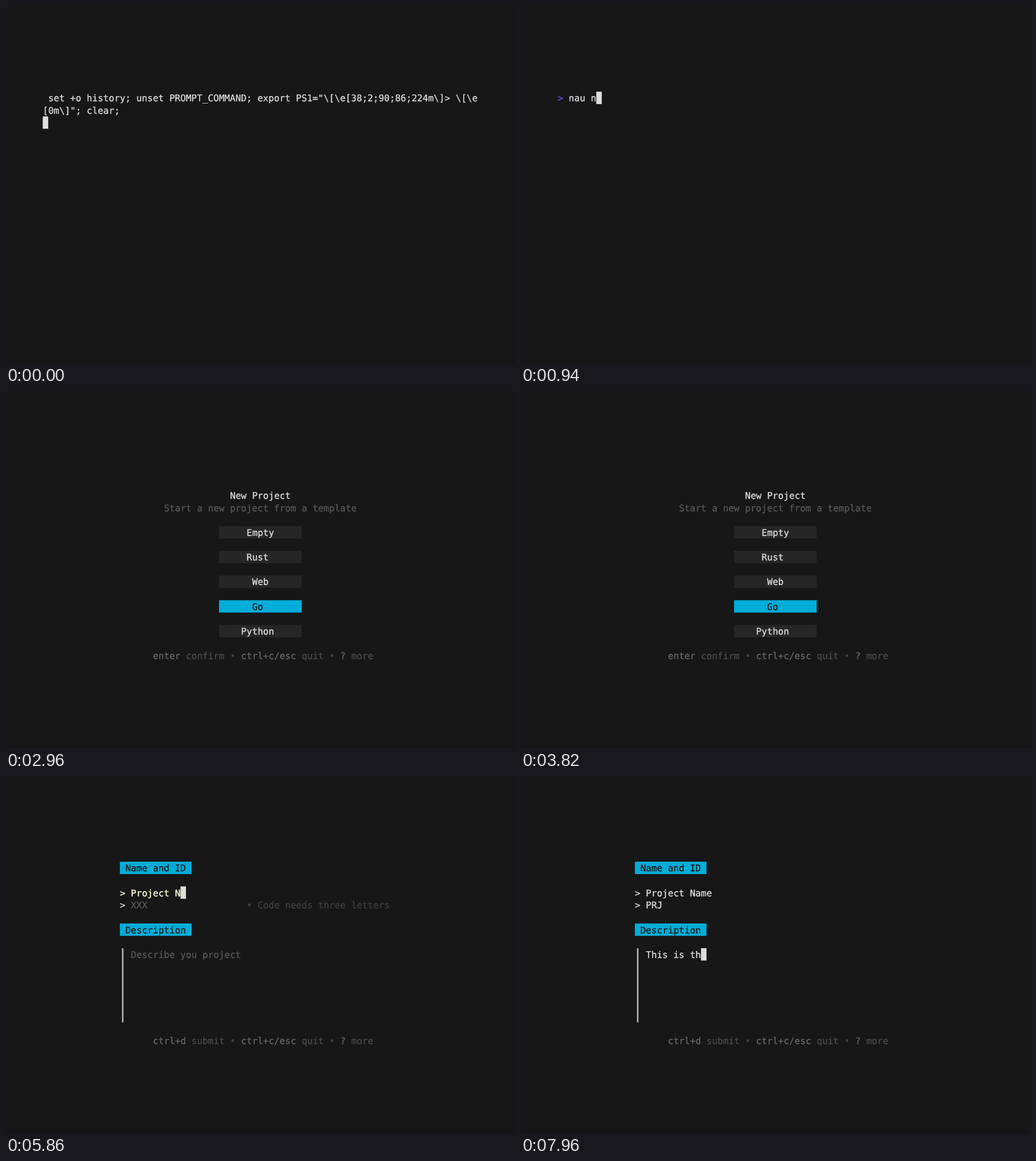
Write an HTML page with a canvas that moves like this. It is 894 px wide and 626 px high and loops after 8 s.

```html
<!DOCTYPE html>
<html lang="en">
<head>
<meta charset="utf-8">
<title>Terminal: new project</title>
<style>
  html, body { margin: 0; width: 100%; height: 100%; overflow: hidden; background: #171717; }
  canvas { display: block; }
</style>
</head>
<body>
<canvas id="stage" width="894" height="626"></canvas>
<script>
const LOOP = 8000;
const CELL = 9.677, LINE = 21.66, LEFT = 64.5, TOP = 150.3;
const BG = '#171717', FG = '#dddddd', CREAM = '#ffffd7', ACCENT = '#00add8';
const DIM = '#585858', KEY = '#666666', HINT = '#4a4a4a', DOT = '#3f3f3f';

const ctx = document.getElementById('stage').getContext('2d');
const colX = col => LEFT + col * CELL;
const rowY = row => TOP + row * LINE;

// A thin outline gives the letters a medium weight
function text(row, col, str, color = FG) {
  const x = colX(col), y = rowY(row) + 16.9;
  ctx.fillStyle = ctx.strokeStyle = color;
  ctx.fillText(str, x, y);
  ctx.strokeText(str, x, y);
}

function block(row, col, width, color) {
  ctx.fillStyle = color;
  ctx.fillRect(colX(col), rowY(row), width * CELL, LINE);
}

function cursor(row, col, char = '') {
  block(row, col, 1, FG);
  text(row, col, char, BG);
}

// The part of str typed by time t, given the time of each key
const typed = (str, times, t) => str.slice(0, times.filter(k => k <= t).length);
const steps = (start, gap, count) => Array.from({ length: count }, (_, i) => start + i * gap);

const COMMAND_KEYS = [760, 800, 840, 900, 940, 1000, 1040];
const NAME_KEYS = [5240, 5320, 5400, 5480, 5560, 5620, 5700, 5780, 5860, 5920, 5980, 6060];
const ID_KEYS = steps(6660, 40, 3);
const ABOUT_KEYS = steps(7580, 42, 10);

function setup(t) {
  text(0, 0, String.raw` set +o history; unset PROMPT_COMMAND; export PS1="\[\e[38;2;90;86;224m\]> \[\e`);
  text(1, 0, String.raw`[0m\]"; clear;`);
  cursor(t < 60 ? 2 : 6, 0);
}

function prompt(t) {
  if (t >= 1100) return;
  const command = typed('nau new', COMMAND_KEYS, t);
  text(0, 0, '>', '#5a56e0');
  text(0, 2, command);
  if (t >= 1080) cursor(1, 0);
  else if (t < 580 || t >= 760) cursor(0, 2 + command.length);
}

function help(key, action) {
  text(14, 20, key, KEY);
  text(14, 21 + key.length, action, HINT);
  text(14, 34, '•', DOT);
  text(14, 36, 'ctrl+c/esc', KEY);
  text(14, 47, 'quit', HINT);
  text(14, 52, '•', DOT);
  text(14, 54, '?', KEY);
  text(14, 56, 'more', HINT);
}

const TEMPLATES = [
  ['Empty', 37, '#dddddd'],
  ['Rust', 37, '#dea584'],
  ['Web', 38, '#e34c26'],
  ['Go', 38, ACCENT],
  ['Python', 36, '#3572a5']
];

function menu(t) {
  const picked = t >= 3820 ? 3 : [1840, 2360, 2960, 3240].filter(k => k <= t).length;
  text(1, 34, 'New Project');
  text(2, 22, 'Start a new project from a template', DIM);
  TEMPLATES.forEach(([label, col, color], i) => {
    const on = i === picked, row = 4 + 2 * i;
    block(row, 32, 15, on ? color : '#262626');
    text(row, col, label, on ? BG : FG);
  });
  help('enter', 'confirm');
}

function heading(row, label) {
  block(row, 14, 13, ACCENT);
  text(row, 15, label, BG);
}

// Typed value or placeholder, with the cursor when focused
function input(row, value, placeholder, focused, color) {
  text(row, 16, value || placeholder, value ? color : DIM);
  if (focused) cursor(row, 16 + value.length, value ? '' : placeholder[0]);
}

function field(row, value, placeholder, focused) {
  const color = focused ? CREAM : FG;
  text(row, 14, '>', color);
  input(row, value, placeholder, focused, color);
}

function form(t) {
  heading(0, 'Name and ID');
  field(2, typed('Project Name', NAME_KEYS, t), 'Project Name', t < 6280);
  field(3, typed('PRJ', ID_KEYS, t), 'XXX', t >= 6280 && t < 7160);
  if (t >= 5240 && t < 6780) text(3, 37, '• Code needs three letters', DOT);
  heading(5, 'Description');
  ctx.fillStyle = '#b8b8b8';
  ctx.fillRect(203.7, rowY(7), 2.6, 6 * LINE);
  input(7, typed('This is th', ABOUT_KEYS, t), 'Describe you project', t >= 7180, FG);
  help('ctrl+d', 'submit');
}

function draw(now) {
  const t = now % LOOP;
  ctx.fillStyle = BG;
  ctx.fillRect(0, 0, 894, 626);
  ctx.fillStyle = '#151515';
  ctx.fillRect(0, 622, 894, 4);
  ctx.font = '16.07px "DejaVu Sans Mono", monospace';
  ctx.textRendering = 'geometricPrecision';
  ctx.lineWidth = 0.3;
  ctx.lineJoin = 'round';
  const scene = t < 80 ? setup : t < 1120 ? prompt : t < 4820 ? menu : form;
  scene(t);
}

let start;
function tick(now) {
  start ??= now;
  draw(now - start);
  requestAnimationFrame(tick);
}
draw(0);
requestAnimationFrame(tick);
</script>
</body>
</html>
```
